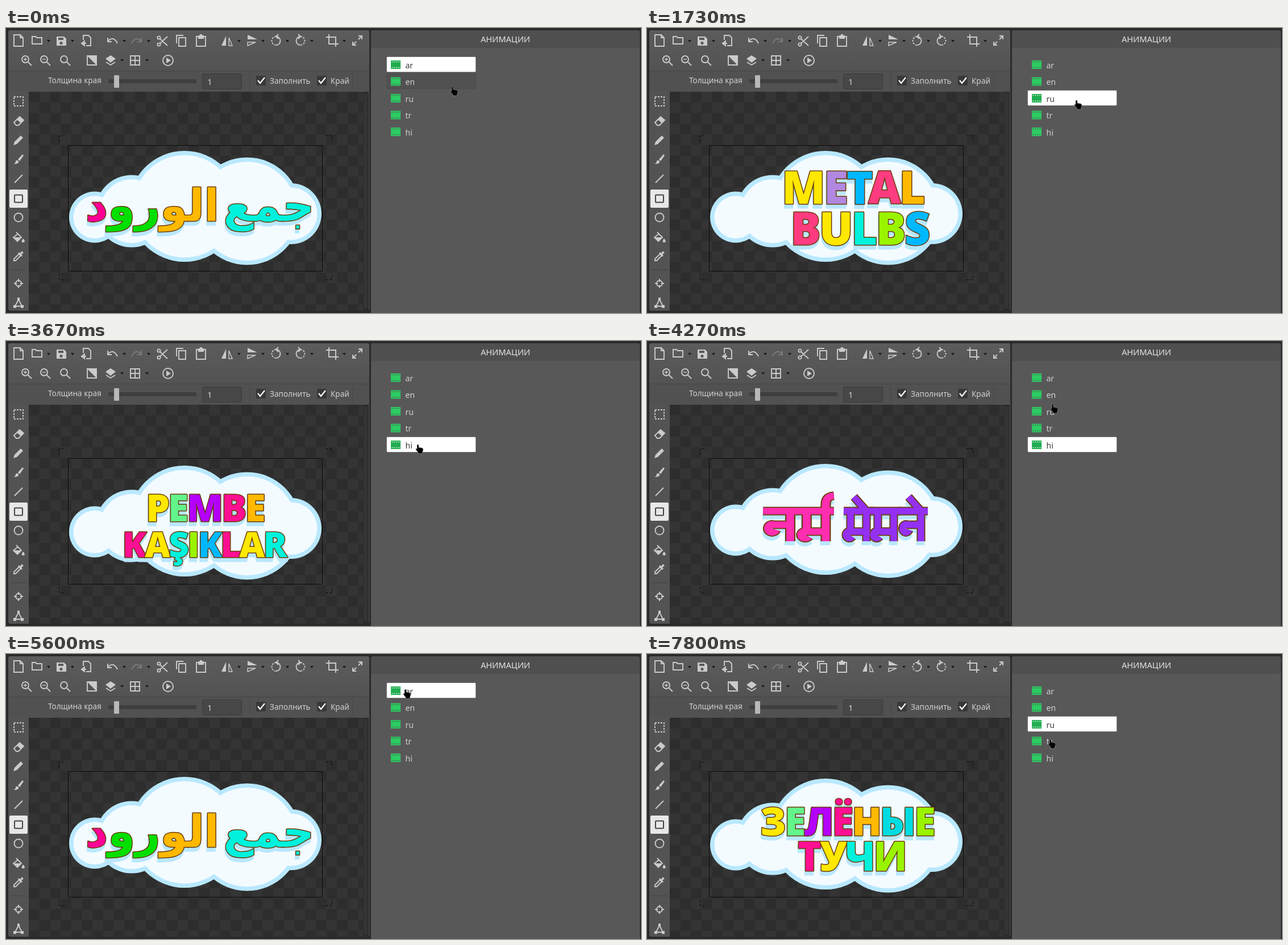
Animation of 1117 by 501 pixels, one loop 8000 ms. Source, as an HTML page:

```html
<!DOCTYPE html>
<html lang="ru">
<head>
<meta charset="utf-8">
<title>Анимации</title>
<style>
html, body { margin: 0; width: 100%; height: 100%; overflow: hidden; background: #2a2a2a; }
svg { display: block; }
text { font-family: "Noto Sans", "Open Sans", sans-serif; font-size: 13.5px; fill: #d2d2d2; }
.line { fill: none; stroke: #cbcbcb; stroke-width: 1.9; }
.solid { fill: #cbcbcb; fill-rule: evenodd; }
.logo { filter: drop-shadow(-1px 7px 0 #b9e7fd); }
.logo text {
  font-family: "Open Sans", "Noto Sans", sans-serif; font-weight: 800; letter-spacing: -3px;
  text-anchor: middle; stroke: #6b3b08; stroke-width: 3px; stroke-linejoin: round; paint-order: stroke;
}
.logo .arabic { font-family: "DejaVu Sans", sans-serif; font-weight: 700; letter-spacing: 0; direction: rtl; }
.strokes { fill: none; stroke-linejoin: round; }

#cursor { animation: cursor 8s linear infinite; }
@keyframes cursor {
  0%, .8% { transform: translate(788px, 111px) }
  1.6%, 9.2% { transform: translate(786px, 111px) }
  10.8% { transform: translate(785px, 110px) }
  18.4%, 22.5% { transform: translate(758px, 135px) }
  27.5%, 30.8% { transform: translate(734px, 161px) }
  30.9%, 35% { transform: translate(734px, 162px) }
  39.1%, 45.9% { transform: translate(727px, 190px) }
  53.4% { transform: translate(716px, 119px) }
  55.9% { transform: translate(718px, 96px) }
  57.5% { transform: translate(719px, 90px) }
  66.6%, 68.4% { transform: translate(706px, 66px) }
  70% { transform: translate(705px, 70px) }
  75.9%, 85% { transform: translate(708px, 109px) }
  85.9% { transform: translate(707px, 120px) }
  88.4%, 92.4% { transform: translate(710px, 133px) }
  97.5%, 100% { transform: translate(712px, 158px) }
}
</style>
</head>
<body>
<svg width="1117" height="501" viewBox="0 0 1117 501">
  <defs>
    <pattern id="checker" x="40" y="112" width="37.4" height="37.4" patternUnits="userSpaceOnUse">
      <path fill="#343434" d="M0 0h37.4v37.4H0z"/>
      <path fill="#2d2d2d" d="M0 0h18.7v18.7H0zM18.7 18.7h18.7v18.7H18.7z"/>
    </pattern>
    <linearGradient id="bar" x2="0" y2="1">
      <stop stop-color="#5c5c5c"/><stop offset="1" stop-color="#535353"/>
    </linearGradient>
    <g id="na"><path d="M0 0H52M40 0V53M40 24H16a6 7 0 1 0 3 9"/></g>
    <g id="ma"><path d="M0 0H52M40 0V53M12 0V36H40M12 36a6 6 0 1 0 3 9"/></g>
    <path id="matra" d="M40 0L18-25"/>
    <g id="soft" transform="translate(204 299) scale(1.2 1)">
      <use href="#na"/><use href="#ma" x="52"/><path d="M92 0V-12Q92-26 104-27"/>
    </g>
    <g id="lambs" transform="translate(346 299)">
      <use href="#ma"/><use href="#matra"/><use href="#ma" x="48"/>
      <use href="#na" x="96"/><use href="#matra" x="96"/>
    </g>
  </defs>

  <!-- editor panel -->
  <rect x="4" y="4" width="635" height="493" rx="4" fill="#535353"/>
  <path fill="url(#bar)" d="M4 8q0-4 4-4H635q4 0 4 4V75H4z"/>
  <path fill="#515151" d="M4 75H639V112H4z"/>
  <path stroke="#464646" d="M4 75.5H639M428.5 80V108M609.5 80V108"/>
  <path fill="url(#checker)" d="M40 112H638V497H40z"/>
  <path fill="#2b2b2b" d="M628 112h10V497h-10z"/>
  <path fill="#3b3b3b" d="M629 115h7V493h-7z" opacity=".6"/>
  <text x="74" y="97">Толщина края</text>
  <rect x="180" y="90" width="155" height="7" rx="2" fill="#3f3f3f"/>
  <rect x="190" y="83" width="9" height="22" rx="1" fill="#b8b8b8"/>
  <rect x="345.5" y="80.5" width="69" height="27" rx="2" fill="#474747" stroke="#3b3b3b"/>
  <text x="354" y="100" style="font-size:15px">1</text>
  <text x="464" y="98">Заполнить</text>
  <text x="571" y="98">Край</text>
  <g id="icons"></g>

  <!-- artboard -->
  <path fill="none" stroke="#0c0c0c" d="M109.5 206.5H556.5V427.5H109.5z"/>
  <path fill="none" stroke="#080808" stroke-dasharray="4 3"
    d="M93.5 200V189.5H105M562 189.5H573.5V200M93.5 432V442.5H105M562 442.5H573.5V432"/>
  <g id="cloud"></g>
  <g id="logos">
    <g class="logo-hi"><g class="logo strokes" role="img" aria-label="नर्म मेमने">
      <g stroke="#6b3b08" stroke-width="15"><use href="#soft"/><use href="#lambs"/></g>
      <g stroke-width="11.5"><use href="#soft" stroke="#ff2db0"/><use href="#lambs" stroke="#9430f2"/></g>
    </g></g>
  </g>

  <!-- animation list -->
  <rect x="642" y="4" width="473" height="500" rx="4" fill="#585858"/>
  <path fill="#4f4f4f" d="M642 8q0-4 4-4H1111q4 0 4 4V35H642z"/>
  <text x="878.5" y="25" text-anchor="middle" style="font-size:14.6px;fill:#e4e4e4">АНИМАЦИИ</text>
  <rect id="hover" x="669.5" y="80.5" width="157" height="26" rx="2" fill="#515151" stroke="#4a4a4a"/>
  <g id="rows"></g>
  <g id="cursor">
    <path stroke="#a5a5a5" stroke-width=".6" stroke-linejoin="round"
      d="M-4-7Q-2.5-9-1-7V-3L5-2Q7-1 7 1L5.5 6V8H-2V6L-6 1Q-6.5-2-4-.5z"/>
  </g>
</svg>
<script>
const byId = id => document.getElementById(id);
const add = (id, html) => byId(id).insertAdjacentHTML('beforeend', html);
const at = (x, y, body) => `<g transform="translate(${x} ${y})">${body}</g>`;
const line = (d, extra = '') => `<path class="line" d="${d}" ${extra}/>`;
const solid = (d, extra = '') => `<path class="solid" d="${d}" ${extra}/>`;
const ring = (x, y, r) => `M${x - r} ${y}a${r} ${r} 0 1 0 ${2 * r} 0a${r} ${r} 0 1 0 ${-2 * r} 0`;

// Clicks in ms; the artboard follows the list one step later.
const LOOP = 8000, LAG = 65;
const langs = ['ar', 'en', 'ru', 'tr', 'hi'];
const clicks = [[0, 'ar'], [670, 'en'], [1730, 'ru'], [2730, 'tr'], [3670, 'hi'], [5470, 'ar'], [6530, 'en'], [7330, 'ru']];
const stepped = (selector, name, lag, rule) => {
  const stops = clicks.map(([ms, lang]) => `${(ms && ms + lag) / LOOP * 100}% { ${rule(lang, ms)} }`);
  return `${selector} { animation: ${name} ${LOOP}ms step-end infinite }
    @keyframes ${name} { ${stops.join(' ')} 100% { ${rule('ru', LOOP)} } }`;
};
const show = on => `visibility: ${on ? 'visible' : 'hidden'}`;
document.head.insertAdjacentHTML('beforeend', '<style>' +
  langs.map(lang =>
    stepped(`.row-${lang}`, `row-${lang}`, 0, picked => show(picked === lang)) +
    stepped(`.logo-${lang}`, `logo-${lang}`, LAG, picked => show(picked === lang))).join('') +
  stepped('#hover', 'hover', 0, (picked, ms) => show(ms === 0)) +
  stepped('#cloud', 'cloud', LAG, picked => `transform: translateY(${'ru tr'.includes(picked) ? 3 : 0}px)`) +
  '</style>');

const undo = line('M-8-5V2H-1M-8 1Q2-9 9 5', 'stroke-width="2.5"');
const flip = solid('M-10 8L-2-9V8Z') + line('M9 8L3-6V8Z', 'style="stroke-width:1.4"');
const turn = line('M0-7A7.5 7.5 0 0 0 0 8', 'stroke-dasharray="3 2"') +
  line('M0-7A7.5 7.5 0 0 1 0 8M4-11L0-7L4-3');
const lens = line(ring(-2, -2, 6) + 'M3 3L9 9');
const mirror = body => `<g transform="scale(-1 1)">${body}</g>`;

const toolbar = [
  [22, 22, line('M-8-10H3L8-5V10H-8ZM3-10V-5H8')],
  [55, 22, line('M-9 6V-7H-3L-1-5H8V6Z')],
  [97, 23, solid('M-8-8H5L9-4V8H-8ZM-5-6H4V-2H-5Z' + ring(0, 3.5, 2.6))],
  [141, 22, line('M-5-1V-9H4L8-5V9H0M-9 5H0M-3 1V9L-8 5Z')],
  [187, 22, undo],
  [230, 22, `<g opacity=".3">${mirror(undo)}</g>`],
  [275, 23, line(ring(-6, -6, 2.6) + ring(-6, 6, 2.6) + 'M-4-4L9 8M-4 4L9-8')],
  [308, 22, line('M-8 5V-9H4M-4-5H8V10H-4Z')],
  [343, 22, line('M-8-7H8V10H-8ZM-2-10H2') + solid('M-5-9H5V-3H-5Z')],
  [389, 23, flip],
  [433, 22, `<g transform="rotate(90)">${flip}</g>`],
  [475, 22, turn],
  [518, 22, mirror(turn)],
  [574, 22, line('M-6-11V6H11M-11-6H6V11')],
  [618, 22, line('M2-8H8V-2M8-8L2-2M-8 2V8H-2M-8 8L-2 2')],
  [36, 57, lens + line('M-5-2H1M-2-5V1', 'style="stroke-width:1.4"')],
  [69, 57, lens + line('M-5-2H1', 'style="stroke-width:1.4"')],
  [104, 57, lens],
  [151, 57, line('M-8-8H8V8H-8Z') + solid('M-8-8H8V8Z')],
  [184, 57, solid('M0-9L9-3L0 4L-9-3Z') + line('M-8 3L0 8L8 3')],
  [227, 57, line('M-8-8H8V8H-8ZM0-8V8M-8 0H8')],
  [285, 57, line(ring(0, 0, 9)) + solid('M-3-5L5 0L-3 5Z')],
];
const tools = [
  [129, line('M-8-8H8V8H-8Z', 'stroke-dasharray="3 2"')],
  [163, line('M-8 3L2-7L9-1L0 8H-4Z') + solid('M-3-2L2-7L9-1L4 4Z')],
  [197, solid('M-9 9L-7 3L4-8L8-4L-3 7Z')],
  [231, solid('M-9 8Q-5 7-5 3Q-3 0 0 3Q2 8-9 8M-1 0L7-9L9-7L2 3Z')],
  [265, line('M-7 7L7-7')],
  [300, '<rect x="-16" y="-16" width="32" height="32" rx="2" fill="#e8e8e8"/>' +
    '<rect x="-7" y="-6.5" width="14" height="13" rx="1" fill="none" stroke="#444" stroke-width="2"/>'],
  [333, line(ring(0, 0, 7.5))],
  [368, line('M-4-9L5 0L-2 7L-9 0L-1-6') + solid('M-8 0H5L-2 7ZM8 2Q14 9 8 9Q3 9 8 2')],
  [401, line('M-8 8V5L1-4L4-1L-5 8Z') + solid('M-1-5L1-7L3-5L6-9L9-6L5-3L7-1L5 1Z')],
  [425, '<path stroke="#414141" d="M-14 0H14"/>'],
  [449, line(ring(0, 0, 5) + 'M0-8V-3M0 3V8M-8 0H-3M3 0H8')],
  [483, line('M0-6L-6 6H6Z') + solid('M-2-9H2V-4H-2ZM-9 4H-4V9H-9ZM4 4H9V9H4Z')],
];
const arrow = (x, y) => `<path d="M${x - 3} ${y - 2}h6l-3 4z" fill="#181818"/>`;
const checkbox = x => `<rect x="${x}" y="84" width="17" height="17" rx="2" fill="#383838"/>` +
  `<path d="M${x + 3} 92l4 5l8-10" fill="none" stroke="#fff" stroke-width="2.2"/>`;

add('icons', toolbar.map(icon => at(...icon)).join('') +
  tools.map(([y, body]) => at(22, y, body)).join('') +
  [75, 117, 208, 251, 410, 452, 495, 538, 595].map(x => arrow(x, 23)).join('') +
  [204, 248].map(x => arrow(x, 57)).join('') + [440, 547].map(checkbox).join(''));

const puffs = [[156, 332.5, 45], [221, 322, 63.5], [314, 313.5, 97.5], [424, 322, 94.5], [501.5, 326.5, 53.5]];
const puffLayer = (inset, fill) => `<g fill="${fill}">` +
  puffs.map(([x, y, r]) => `<circle cx="${x}" cy="${y}" r="${r - inset}"/>`).join('') + '</g>';
add('cloud', puffLayer(0, '#b9e8fe') + puffLayer(7.5, '#f3fbff'));

const word = (parts, x, y, size, colors, kind = '') =>
  `<text class="${kind}" x="${x}" y="${y}" style="font-size:${size}px">` +
  [...parts].map((part, i) => `<tspan fill="${colors[i % colors.length]}">${part}</tspan>`).join('') + '</text>';
const logo = (lang, ...words) => `<g class="logo-${lang}"><g class="logo">${words.join('')}</g></g>`;

const pink = '#ff0f91', yellow = '#ffe800', aqua = '#00f2dc', lime = '#9af400', sky = '#00b8ff', amber = '#ffb900';
add('logos',
  logo('ar', word(['جمع\u200a', 'الو', 'رو', 'د'], 341, 339, 77, [aqua, amber, '#00e000', '#ff0096'], 'arabic')) +
  logo('en',
    word('METAL', 362, 309, 79, [yellow, '#b187df', sky, '#ff3c80', amber]),
    word('BULBS', 374, 381, 79, ['#ff3c80', yellow, aqua, lime, sky])) +
  logo('ru',
    word('ЗЕЛЁНЫЕ', 352, 319, 68.5, [yellow, '#62f58b', '#b400ff', pink, amber, '#00dce2', lime]),
    word('ТУЧИ', 360, 381, 70, [pink, yellow, aqua, lime])) +
  logo('tr',
    word('PEMBE', 350, 317, 66, [yellow, '#62f58b', '#b400ff', pink, amber]),
    word('KAŞIKLAR', 348, 380, 62, [pink, yellow, aqua, lime, sky])));

const film = (y, fill, holes) => `<path fill="${fill}" d="M677 ${y}h17v15h-17z"/>` +
  [2.5, 12.5].map(dy => `<path stroke="${holes}" stroke-width="1.6" stroke-dasharray="2 2"
    d="M678.5 ${y + dy}h15"/>`).join('');
add('rows', langs.map((lang, i) => {
  const y = 51 + 29.5 * i;
  const label = style => `<text x="702.5" y="${y + 19.5}" style="font-size:14px;${style}">${lang}</text>`;
  return film(y + 6, '#2dcb63', '#47694f') + label('') +
    `<g class="row-${lang}">` +
    `<rect x="669.5" y="${Math.round(y - 1) + .5}" width="157" height="27" rx="2" fill="#fff" stroke="#777"/>` +
    film(y + 6, '#20ad50', '#d8f2e0') + label('fill:#3a3a3a') + '</g>';
}).join(''));
</script>
</body>
</html>
```
